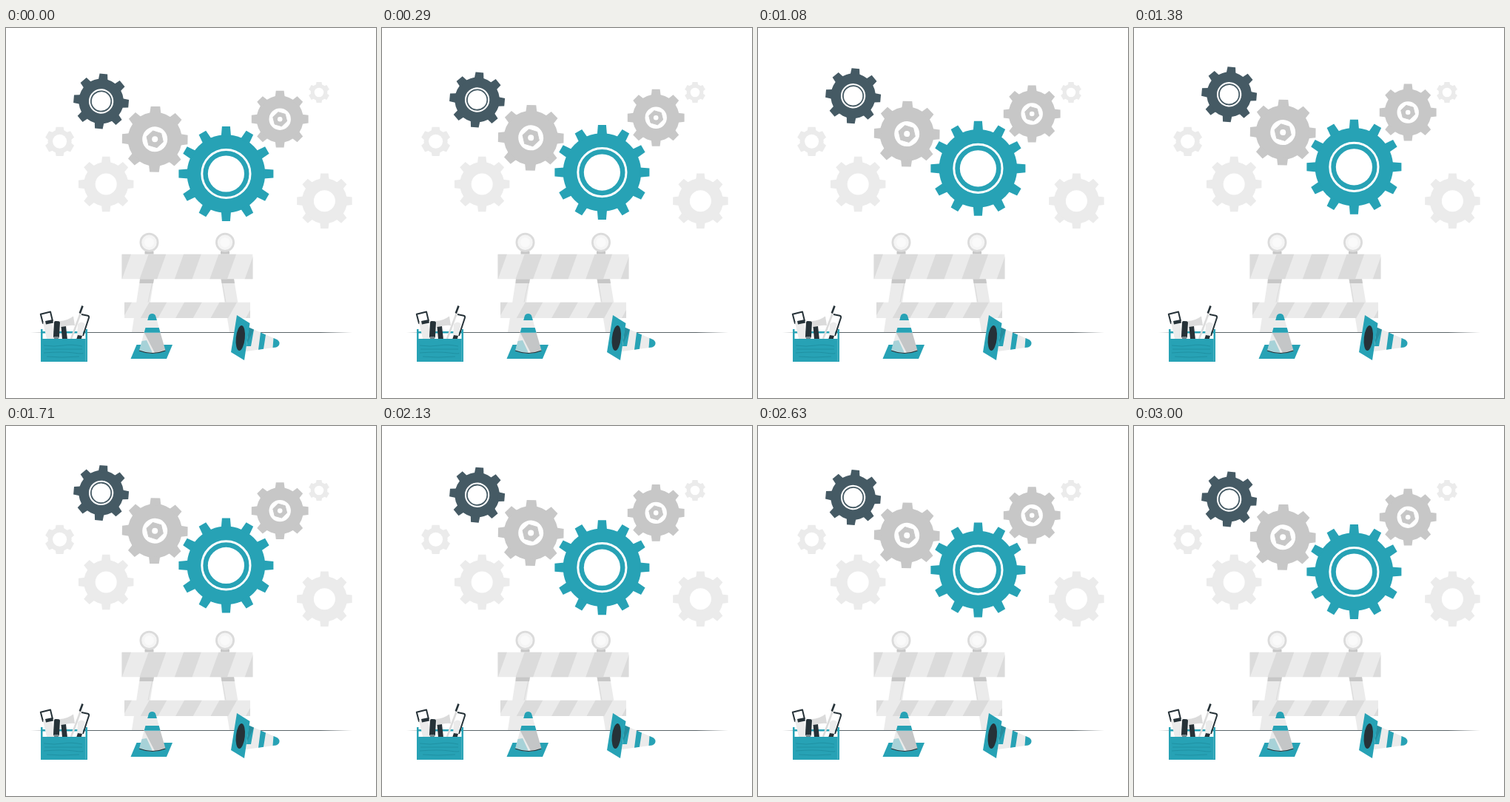
Animation of 500x500 px, one loop 3.04 s. Source, as an HTML page:

```html
<!DOCTYPE html>
<html lang="en">
<head>
<meta charset="utf-8">
<title>Under construction</title>
<style>
  html, body { margin: 0; width: 100%; height: 100%; overflow: hidden; background: #fff; }
  svg { display: block; width: 100vw; height: 100vh; }
  .teal { fill: #27a2b5; }
  .light { fill: #ebebeb; }
  .mid { fill: #dbdbdb; }
  .gray { fill: #c7c7c7; }
  .slate { fill: #455a64; }
  .dark { fill: #263238; }
  .wire { fill: none; stroke: #263238; stroke-width: 2; stroke-linejoin: round; }
</style>
</head>
<body>
<svg viewBox="0 0 500 500">
  <defs>
    <linearGradient id="fade">
      <stop offset="0" stop-color="#263238" stop-opacity="0"/>
      <stop offset=".1" stop-color="#263238" stop-opacity=".75"/>
      <stop offset=".9" stop-color="#263238" stop-opacity=".75"/>
      <stop offset="1" stop-color="#263238" stop-opacity="0"/>
    </linearGradient>
    <g id="lamp">
      <path class="gray" d="M-6 16v-4q6-4 12 0v4z"/>
      <circle r="11.6" fill="#f5f5f5" stroke="#dbdbdb" stroke-width="2.8"/>
      <circle r="6.5" fill="#fafafa"/>
    </g>
  </defs>

  <g id="still"></g>
  <g id="float"></g>

  <g id="barrier">
    <path class="light" d="M181 339H200L188.500 411H170zM290.500 339H308L320 411H302z"/>
    <path d="M197.500 345L192 371M292.500 345L297 371" stroke="#dbdbdb" fill="none"/>
    <path class="gray" d="M181 339H200L199 345H180.500zM290.500 339H308L309 345H291.500z"/>
    <use href="#lamp" x="193.500" y="289.700"/>
    <use href="#lamp" x="296" y="289.700"/>
  </g>

  <rect x="33" y="411" width="435" height="1" fill="url(#fade)"/>

  <g id="toolbox">
    <path class="teal" d="M47 407h2.500v14h-2.500zM107.500 407h2.500v14h-2.500zM49 410h59v2.500h-59z"/>
    <path class="wire" d="M55 399L50 399L46.800 386.800L60 383.500L63 396" stroke-width="2.400"/>
    <path class="light" d="M50 398L55 397L62 420H55z"/>
    <path class="light" d="M55 400L62 399L67 420H58z"/>
    <path class="dark" d="M53 396L63 394L64 398.500L54 400.500z"/>
    <path class="mid" d="M73 396Q82 396 91 389.500L93 402Q85 401 74 405z"/>
    <path class="dark" d="M74.500 404L81 403L83 421H76z"/>
    <rect class="dark" x="64.500" y="396" width="8" height="23" rx="2" transform="rotate(3 68 407)"/>
    <path class="wire" d="M102 387L110.500 388.800Q112.500 389.500 112 391.500L104 416" stroke-width="1.800"/>
    <path d="M101 385L88 420" stroke="#dbdbdb" stroke-width="2.600"/>
    <path d="M103.500 375.500L99.800 385.500" stroke="#263238" stroke-width="2.600"/>
    <path class="light" d="M97 400Q102 395 107 400L103 416H96z"/>
    <path class="dark" d="M97 415L103 416L101.500 421H95z"/>
    <path d="M65 417h6v4h-6z" fill="#78868c"/>
    <rect class="teal" x="47" y="420" width="63" height="31"/>
    <path d="M107.800 420V450" stroke="#5fbac8" stroke-width=".8"/>
    <path d="M51 429q15 2 26 0t26 1M52 434h51M51 439q25-2 40 0t13 0M55 444q20 2 44 0" fill="none" stroke="#1c8797" stroke-width=".6"/>
  </g>

  <g id="standing">
    <path class="teal" d="M176.500 428H225L217 447H168.500z"/>
    <path class="light" d="M192.500 390Q193.500 386 197.500 386T202.500 390L215.500 436Q198 443 180 436z"/>
    <path class="teal" d="M192.500 390Q193.500 386 197.500 386T202.500 390L203.900 395H191.200zM188.500 405H206.700L208.600 411.700H186.700z"/>
    <path d="M187 412H208.600L215.500 436Q209 439 201 439z" fill="#263238" opacity=".2"/>
    <path class="teal" d="M183.500 423L180 436Q188 439 198 439L190 422z" opacity=".35"/>
    <path d="M180 436Q198 443 215.500 436" fill="none" stroke="#263238" stroke-width="1.200"/>
  </g>

  <g id="fallen">
    <path class="light" d="M328 404.500L365 420.500Q369.500 422.500 369.500 426T365 431.500L324 437z"/>
    <path class="teal" d="M361.500 419L365 420.500Q369.500 422.500 369.500 426T365 431.500L360.500 432zM344 411.500L351 414.500L348 433.800L341 434.700zM328 404.500L335 407.500L331 430L325 430z"/>
    <path d="M328 404.500L335 407.500L325.500 427z" fill="#263238" opacity=".18"/>
    <path class="teal" d="M312 388L329.500 399L322 449L304 438z"/>
    <ellipse class="dark" cx="316.800" cy="419" rx="6" ry="17" transform="rotate(6 316.800 419)"/>
  </g>
</svg>

<script>
const NS = 'http://www.w3.org/2000/svg';
const $ = id => document.getElementById(id);

function add(parent, tag, attrs) {
  const el = document.createElementNS(NS, tag);
  for (const key in attrs) el.setAttribute(key, attrs[key]);
  return parent.appendChild(el);
}

function gear(layer, cls, x, y, outer, body, teeth, half, turn = 0) {
  const g = add($(layer), 'g', { class: cls, transform: `translate(${x} ${y}) rotate(${turn})` });
  const base = half * 1.2, inner = body - 2;
  add(g, 'circle', { r: body });
  for (let i = 0; i < teeth; i++)
    add(g, 'path', {
      d: `M${-base} ${-inner}L${-half} ${-outer}H${half}L${base} ${-inner}z`,
      transform: `rotate(${i * 360 / teeth})`
    });
  return g;
}

const disc = (g, r, fill = '#fff') => add(g, 'circle', { r, style: 'fill:' + fill });
const ring = (g, r, width, color = '#fff') =>
  add(g, 'circle', { r, style: `fill:none;stroke:${color};stroke-width:${width}` });

function nut(g, rim, size, hole) {
  disc(g, rim);
  const points = [...Array(6)].map((_, i) => {
    const a = (i * 60 - 104) * Math.PI / 180;
    return [size * Math.cos(a), size * Math.sin(a)];
  });
  add(g, 'polygon', { points: points.join(' '), stroke: '#c7c7c7', 'stroke-width': 1, 'stroke-linejoin': 'round' });
  disc(g, hole);
}

disc(gear('still', 'light', 135.2, 211, 37.2, 30, 8, 5.2), 14.5);
disc(gear('still', 'light', 430.4, 233.8, 37.2, 30.5, 8, 5.2), 14.5);
disc(gear('still', 'light', 72.6, 153.3, 19.6, 16, 6, 5), 9.5);
disc(gear('still', 'light', 423, 87, 14, 11.3, 6, 3.5), 6.3);

const slate = gear('float', 'slate', 128.6, 99, 37.2, 30.3, 8, 5.3, 5);
disc(slate, 16.7);
ring(slate, 13.7, 1.8, '#455a64');

nut(gear('float', 'gray', 201.2, 150.3, 44.3, 36.6, 8, 6.3, 1), 17, 11.6, 4);
nut(gear('float', 'gray', 370.2, 123.2, 38.4, 31.6, 8, 5.4), 14.7, 9.8, 3.3);

const teal = gear('float', 'teal', 297.4, 197, 64, 52.8, 12, 5.5);
ring(teal, 32.6, 3);
disc(teal, 24.6);

// Board with slanted stripes clipped to its outline
function board(x, y, w, h, first, slant) {
  const id = 'clip' + y;
  add(add($('barrier'), 'clipPath', { id }), 'rect', { x, y, width: w, height: h });
  const g = add($('barrier'), 'g', { 'clip-path': `url(#${id})` });
  add(g, 'rect', { class: 'light', x, y, width: w, height: h });
  for (let i = 0; i < 5; i++)
    add(g, 'path', { class: 'mid', d: `M${first + i * 47.4} ${y}h23.7l${-slant} ${h}h-23.7z` });
}
board(156.5, 305.5, 177, 34, 145.3, 12.3);
board(160, 370.5, 170, 21.5, 146.3, 12);

// Linear rise and fall of 10px over 3s, with a short rest before the loop
function draw(now) {
  const p = Math.min(now % 3040 / 3000, 1);
  const lift = 10 * (1 - Math.abs(2 * p - 1));
  $('float').setAttribute('transform', `translate(0 ${-lift})`);
  requestAnimationFrame(() => draw(performance.now()));
}
draw(performance.now());
</script>
</body>
</html>
```
